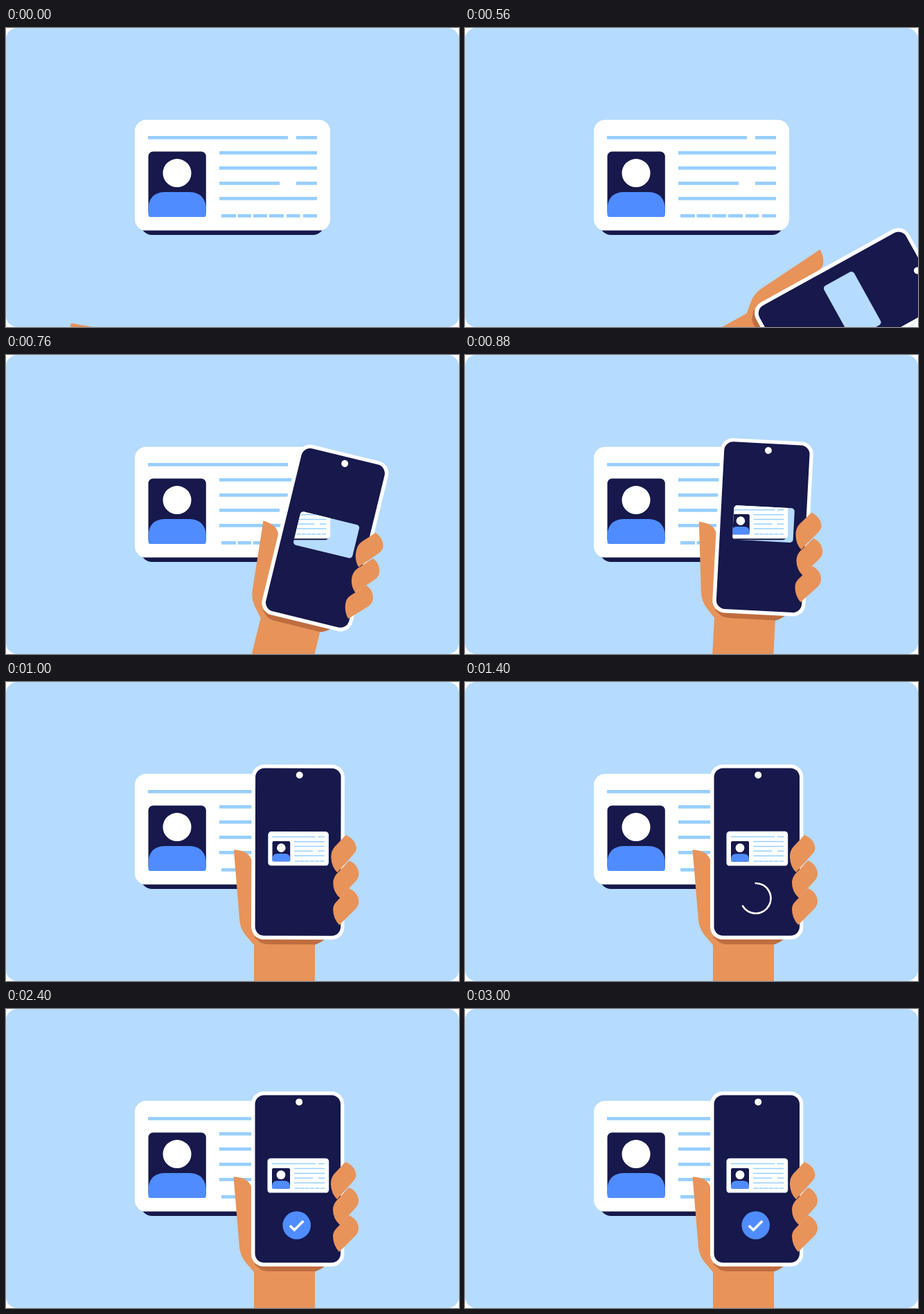
These frames come from a looping animation (654x432 px, 3.04 s). An HTML page:

```html
<!DOCTYPE html>
<html lang="en">
<head>
<meta charset="utf-8">
<title>ID scan</title>
<style>
  html, body { margin: 0; width: 100%; height: 100%; overflow: hidden; background: #fff; }
  svg { display: block; width: 100vw; height: 100vh; }
  .navy { fill: #17184b; }
  .sky { fill: #b5dbff; }
  .blue { fill: #4f8cff; }
  .skin { fill: #e89359; }
  .line { stroke: #97cfff; stroke-width: 4.8; fill: none; }
</style>
</head>
<body>
<svg viewBox="0 0 654 432">
  <defs>
    <clipPath id="stage"><rect width="654" height="432" rx="16"/></clipPath>
    <clipPath id="viewfinder"><rect id="viewRect" x="378" y="216" width="87.6" height="49.6" rx="4.5"/></clipPath>
    <g id="card">
      <rect class="navy" x="194" y="262" width="266" height="37" rx="17"/>
      <rect x="186" y="132.8" width="282" height="159.8" rx="16" fill="#fff"/>
      <path class="line" d="M205 158.3H407M419 158.3H449M308 180.4H449M308 202.4H449M308 224.4H395M419 224.4H449M308 246.4H449M311 271.4H332M334.5 271.4H354M357 271.4H377M380 271.4H401M405 271.4H424.5M429 271.4H449"/>
      <rect class="navy" x="205.5" y="178.5" width="83.3" height="94.5" rx="7"/>
      <path class="blue" d="M205.5 270V260Q207 237 230 237H264Q287 237 288.8 260V270Q288.8 273 286 273H208.5Q205.5 273 205.5 270Z"/>
      <circle cx="247" cy="209.6" r="20.5" fill="#fff"/>
    </g>
  </defs>
  <g clip-path="url(#stage)">
    <rect class="sky" width="654" height="432"/>
    <use href="#card"/>
    <g class="held">
      <path class="skin" d="M328.5 242.5C343 243 354 248 355 262L362 366H446V720H358V380L346 366Q338 356 337 344Z"/>
      <path fill="#bf6d3f" d="M358 368H464Q456 376 447 379H380Q372 379 367 376Z"/>
      <rect x="354" y="119.3" width="134.3" height="252.7" rx="18" fill="#fff"/>
      <rect class="navy" x="359.5" y="124.5" width="123.5" height="242" rx="13"/>
      <circle cx="423.2" cy="134.4" r="5" fill="#fff"/>
    </g>
    <g clip-path="url(#viewfinder)">
      <rect class="sky" width="654" height="432"/>
      <use id="mini" href="#card"/>
    </g>
    <g class="held">
      <path class="skin" d="M490 221C500 225 505 232 505.5 240Q505 245 501 249L478 275Q469 266 469 252Q469 244 474 238Z"/>
      <path class="skin" d="M495 258C504 261 509 270 509 277Q509 283 504 288L482 312Q472 303 472 290Q472 283 477 277Z"/>
      <path class="skin" d="M495 298C505 302 509 310 509 317Q509 322 505 327L481 351Q472 341 472 328Q472 322 477 317Z"/>
    </g>
    <path id="ring" fill="none" stroke="#fff" stroke-width="2.6" stroke-linecap="round"/>
    <circle id="badge" class="blue" cx="419.7" cy="312.5"/>
    <path id="check" d="M409.8 313L416.3 319.3L429.3 306.3" pathLength="1" fill="none" stroke="#fff" stroke-width="3.6"/>
  </g>
</svg>
<script>
const LOOP = 3040, RAD = Math.PI / 180;
const $ = id => document.getElementById(id);
const held = document.querySelectorAll('.held');

const progress = (t, start, end) => Math.min(1, Math.max(0, (t - start) / (end - start)));
const easeInOut = u => u < .5 ? 4 * u ** 3 : 1 - 4 * (1 - u) ** 3;
const ease = (t, start, end) => easeInOut(progress(t, start, end));

// The phone swings in around the wrist while the wrist rises.
function holdTransform(q) {
  const dx = 29 * q - 52.5 * q * q;
  const dy = 98.9 * q + 44.6 * q * q;
  return `translate(${dx} ${dy}) rotate(${100 * q} 421 400.5)`;
}

function arc(from, to) {
  const point = deg => {
    const a = (deg - 90) * RAD;
    return `${419.7 + 21.8 * Math.cos(a)} ${312.5 + 21.8 * Math.sin(a)}`;
  };
  return `M${point(from)}A21.8 21.8 0 ${to - from > 180 ? 1 : 0} 1 ${point(to)}`;
}

function draw(t) {
  const q = 1 - ease(t, 133, 1063);
  const hold = holdTransform(q);
  held.forEach(g => g.setAttribute('transform', hold));

  const pop = 1 + .014 * ease(t, 1000, 1160);
  const zoom = `translate(422 240.6) scale(${pop})`;
  $('viewRect').setAttribute('transform', `${hold} ${zoom} translate(-422 -240.6)`);
  $('mini').setAttribute('transform',
    `translate(${20 * q} 0) ${zoom} scale(.3085) translate(-327 -212.7)`);

  const head = Math.min(359.9, 360 * ease(t, 1120, 1620));
  const tail = 360 * ease(t, 1463, 2013);
  $('ring').setAttribute('d', head - tail > .5 ? arc(tail, head) : '');

  $('badge').setAttribute('r', 20.3 * ease(t, 1720, 2110));
  const drawn = ease(t, 2060, 2320);
  $('check').setAttribute('stroke-dasharray', `${drawn} 2`);
  $('check').setAttribute('visibility', drawn > 0 ? 'visible' : 'hidden');
}

const begin = performance.now();
function tick() {
  draw((performance.now() - begin) % LOOP);
  requestAnimationFrame(tick);
}
tick();
</script>
</body>
</html>
```
